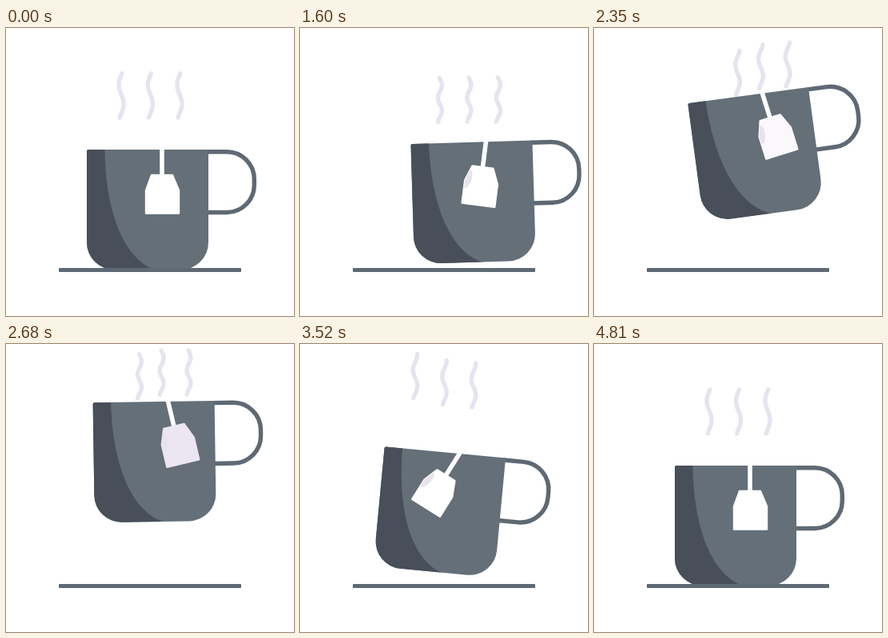
Write an HTML page with a canvas that moves like this. It is 360 px wide and 360 px high and loops after 4840 ms.

```html
<!DOCTYPE html>
<html lang="en">
<head>
<meta charset="utf-8">
<title>Hovering cup of tea</title>
<style>
html, body { margin: 0; width: 100%; height: 100%; overflow: hidden; background: #fff; }
canvas { display: block; width: 100vmin; height: 100vmin; }
</style>
</head>
<body>
<canvas id="stage"></canvas>
<script>
const LOOP = 4840;
const SIZE = 360;
const START = 1030;
const CUP = '#656f78', SHADE = '#484f59', LINE = '#5f6974';
const LILAC = '#e8e3ee', WHITE = '#fff';
const canvas = document.getElementById('stage');
const ctx = canvas.getContext('2d');
const ratio = Math.max(1, window.devicePixelRatio || 1);
canvas.width = canvas.height = SIZE * ratio;

// Sine ease from 0 to 1 between two times
function ease(t, from, to) {
  const u = Math.min(1, Math.max(0, (t - from) / (to - from)));
  return (1 - Math.cos(Math.PI * u)) / 2;
}

// The cup slides right, lifts off, drifts back and lands
const cupX = t => 47 * ease(t, START, 1800) - 49.6 * ease(t, 1682, 3144) + 2.6 * ease(t, 3500, 3960);
const cupY = t => 80 * (ease(t, 2700, 3880) - ease(t, 1290, 2700));
const cupTurn = t => 16.2 * ease(t, 2150, 3200) - 9.1 * ease(t, 1380, 2150) - 7.1 * ease(t, 3290, 4000);

// The bag swings behind the cup and settles
const bagTurn = t => 13 * ease(t, START, 1320) - 30.5 * ease(t, 1320, 2300)
  + 49.5 * ease(t, 2480, 3540) - 40 * ease(t, 3540, 4000) + 8 * ease(t, 4000, 4500);
const bagTint = t => ease(t, 2200, 2640) - ease(t, 2720, 3150);
const patchAlpha = t => ease(t, 1450, 1600) - ease(t, 3520, 3750);

// Wisps follow the cup; those further left lag more
const steamX = (t, lag) => 42 * (ease(t, START, 1900) - ease(t, 1676 + lag, 3220 + lag));
const steamY = (t, lag) => 6 * ease(t, START, 1540) - 55 * ease(t, 1500, 2680 + lag)
  + 49 * ease(t, 2960 + lag, 4400 + lag);

// The wisps tighten three times while the cup is moving
function ripple(t) {
  const u = (t - START) / 1100;
  return u > 0 && u < 3 ? Math.sin(Math.PI * u) ** 2 : 0;
}

function drawSteam(t) {
  const k = ripple(t);
  const length = 48 - 16 * k, crest = 19 * k - 10, width = 3 - 0.5 * k;
  ctx.strokeStyle = LILAC;
  ctx.lineWidth = 5.4;
  ctx.lineCap = ctx.lineJoin = 'round';
  for (let n = 0; n < 3; n++) {
    const lag = 70 * (2 - n) ** 2;
    const x = 144 + 36.5 * n + steamX(t, lag), y = 57 + steamY(t, lag);
    ctx.beginPath();
    for (let s = 0; s <= 55; s++) {
      ctx.lineTo(x + width * Math.cos(2 * Math.PI * (s - crest) / length), y + s);
    }
    ctx.stroke();
  }
}

function rotateAt(x, y, degrees) {
  ctx.translate(x, y);
  ctx.rotate(degrees * Math.PI / 180);
  ctx.translate(-x, -y);
}

const cupBody = new Path2D(
  'M103 152H253V268A34 34 0 0 1 219 302H135A34 34 0 0 1 101 268V154Q101 152 103 152Z');
const cupShade = new Path2D('M100 151H123.5C124 225 145 288 187 302.5H100Z');
const handle = new Path2D('M251 154.7H276A34.3 34.3 0 0 1 310.3 189V196.2A34.3 34.3 0 0 1 276 230.5H251');
const bagBody = new Path2D('M182 184H208L216 203V231.5H175V203Z');

function drawCup() {
  ctx.strokeStyle = LINE;
  ctx.lineWidth = 5.4;
  ctx.lineCap = 'butt';
  ctx.stroke(handle);
  ctx.fillStyle = CUP;
  ctx.fill(cupBody);
  ctx.save();
  ctx.clip(cupBody);
  ctx.fillStyle = SHADE;
  ctx.fill(cupShade);
  ctx.restore();
}

function drawBag(t) {
  const tint = bagTint(t);
  const mix = to => Math.round(255 + (to - 255) * tint);
  ctx.fillStyle = WHITE;
  ctx.fillRect(192.2, 151, 5.6, 34);
  ctx.fillStyle = ctx.strokeStyle = `rgb(${mix(235)},${mix(230)},${mix(241)})`;
  ctx.lineWidth = 2.4;
  ctx.lineJoin = 'round';
  ctx.fill(bagBody);
  ctx.stroke(bagBody);
  ctx.save();
  ctx.clip(bagBody);
  ctx.globalAlpha = patchAlpha(t);
  ctx.fillStyle = LILAC;
  ctx.beginPath();
  ctx.ellipse(178, 201, 5, 12, 0.2, 0, 2 * Math.PI);
  ctx.fill();
  ctx.restore();
}

function draw(t) {
  ctx.setTransform(ratio, 0, 0, ratio, 0, 0);
  ctx.fillStyle = WHITE;
  ctx.fillRect(0, 0, SIZE, SIZE);
  drawSteam(t);

  const turn = cupTurn(t);
  ctx.save();
  ctx.translate(cupX(t), cupY(t));
  rotateAt(177, 226, turn);
  drawCup();
  rotateAt(195, 152, bagTurn(t) - turn);
  drawBag(t);
  ctx.restore();

  ctx.fillStyle = LINE;
  ctx.beginPath();
  ctx.roundRect(66, 300, 228, 5, 1);
  ctx.fill();
}

const start = performance.now();
function tick() {
  draw((performance.now() - start) % LOOP);
  requestAnimationFrame(tick);
}
tick();
</script>
</body>
</html>
```
